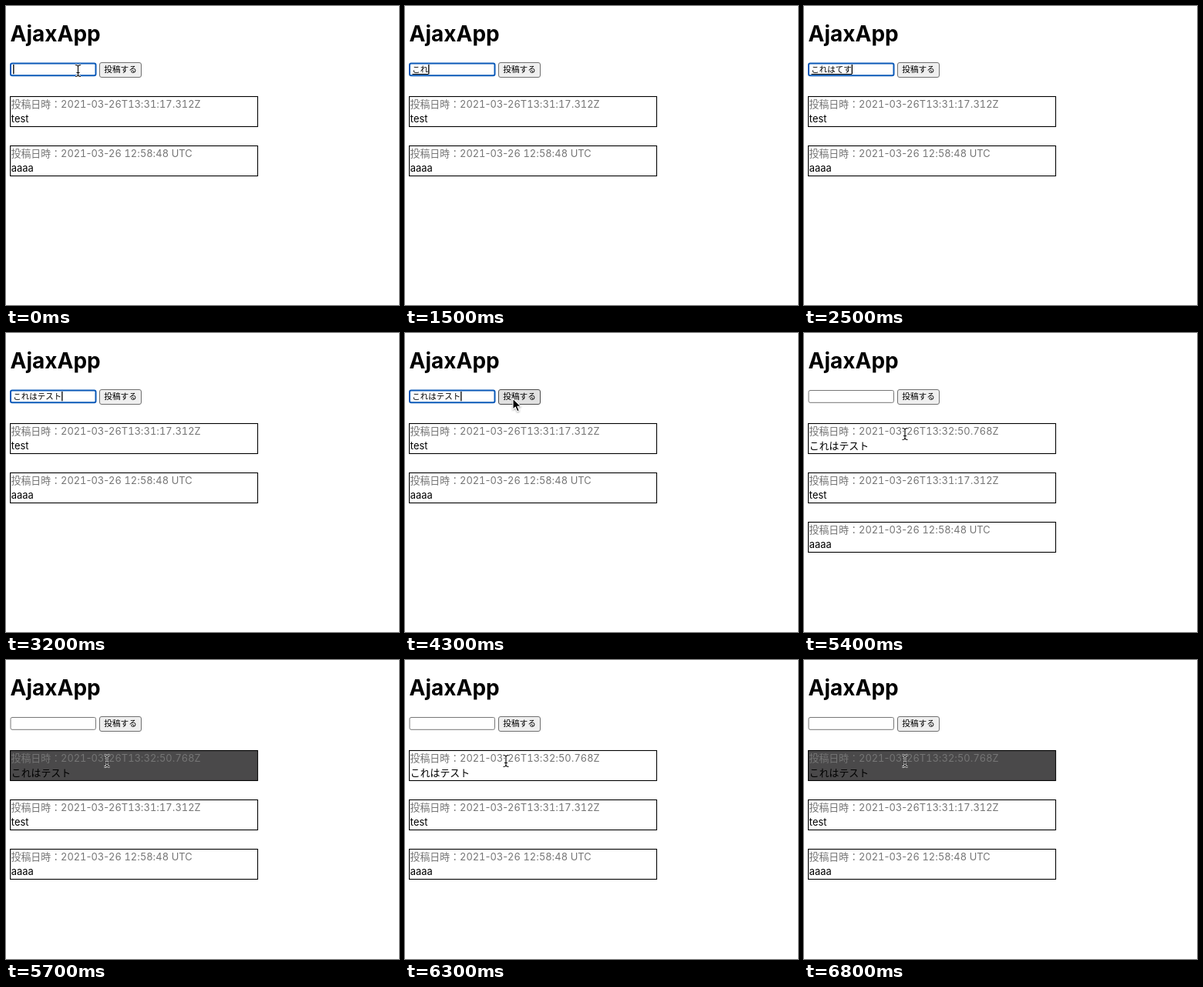
An HTML page that plays this animation: 510 px wide and 388 px high, repeating every 7.4 s.

```html
<!DOCTYPE html>
<html lang="ja">
<head>
<meta charset="utf-8">
<title>AjaxApp</title>
<style>
  html, body { margin: 0; width: 100%; height: 100%; overflow: hidden; background: #fff; }
  svg { display: block; width: 510px; height: 388px; }
  text {
    font: 12.9px Inter, "Noto Sans CJK JP", "Noto Sans CJK", sans-serif;
    font-feature-settings: "calt" 0;
    white-space: pre;
  }
  .num { font-feature-settings: "tnum" 1, "calt" 0; }
  .title { font-size: 28px; font-weight: 700; }
  .field { fill: #fff; stroke: #767676; }
  .focus .field { stroke: #0a59b8; stroke-width: 2; }
  .typed { font-size: 10.5px; font-weight: 500; }
  .button rect { fill: #efefef; stroke: #707070; }
  .button text { font-size: 10.7px; font-weight: 500; }
  .button.hover rect { fill: #e1e1e1; stroke: #4c4c4c; }
  .button.active rect { fill: #f5f5f5; stroke: #8d8d8d; }
  .post rect { fill: #fff; stroke: #000; stroke-width: 1.1; }
  .post .date { fill: #757575; }
  .post.checked rect { fill: #4a494a; }
  .outline { fill: none; stroke: #fff; stroke-width: 2.6; stroke-linejoin: round; }
  .stem { fill: none; stroke: #000; stroke-width: 1.1; }
  .arrow { stroke: #fff; stroke-width: 1.1; stroke-linejoin: round; filter: drop-shadow(0 1px 1px rgba(0, 0, 0, .35)); }
</style>
</head>
<body>
<svg viewBox="0 0 510 388">
  <text class="title" x="5.5" y="45.5">AjaxApp</text>

  <g id="form">
    <rect class="field" x="6" y="74.5" width="110.5" height="15.8" rx="2"/>
    <text class="typed" id="typed" x="9.2" y="85.8"></text>
    <rect id="underline" x="9.5" y="88" height="1"/>
    <rect id="caret" y="76" width="1.3" height="12.3"/>
  </g>

  <g class="button" id="button">
    <rect x="121.5" y="73.5" width="54" height="19" rx="2.5"/>
    <text x="127.2" y="86.2">投稿する</text>
  </g>

  <g id="posts"></g>

  <g id="beam">
    <path class="outline" d="M-3.5-7.5Q0-7.5 0-5Q0-7.5 3.5-7.5M0-5V5M-3.5 7.5Q0 7.5 0 5Q0 7.5 3.5 7.5M-2 2.5H2"/>
    <path class="stem" d="M-3.5-7.5Q0-7.5 0-5Q0-7.5 3.5-7.5M0-5V5M-3.5 7.5Q0 7.5 0 5Q0 7.5 3.5 7.5M-2 2.5H2"/>
  </g>
  <path class="arrow" id="arrow" d="M0 0V14.2L3.3 11.2L5.7 16.8L8.3 15.7L5.9 10.2H10.3Z"/>
</svg>

<script>
const LOOP = 7400;
const CHAR = 10.5;
const $ = id => document.getElementById(id);

// [start ms, text, underline thickness]
const typing = [
  [0, '', 0],
  [1000, 'ｋ', 1], [1200, 'こ', 1], [1300, 'こｒ', 1], [1400, 'これ', 1],
  [1900, 'これｈ', 1], [2000, 'これは', 1], [2100, 'これはｔ', 1], [2200, 'これはて', 1],
  [2300, 'これはてｓ', 1], [2500, 'これはてす', 1],
  [2800, 'これはてすｔ', 1], [2900, 'これはてすと', 1],
  [3000, 'これはテスト', 1.6], [3200, 'これはテスト', 0],
  [4600, '', 0]
];

// [start ms, pointer shape, x, y]
const pointer = [
  [0, 'beam', 93.5, 84], [1200, '', 0, 0],
  [3700, 'beam', 93.5, 84], [3800, 'beam', 98, 82], [3900, 'beam', 107, 79],
  [4000, 'arrow', 120, 77], [4100, 'arrow', 131, 80], [4200, 'arrow', 137, 83], [4300, 'arrow', 140, 85],
  [5000, 'arrow', 139, 89], [5100, 'arrow', 137, 98], [5200, 'arrow', 135, 109],
  [5300, 'beam', 132, 125], [5400, 'beam', 131, 131]
];

// Digits share one width, punctuation keeps its own.
const tabular = date => date.replace(/\d+/g, '<tspan class="num">$&</tspan>');

const posts = [
  ['2021-03-26T13:32:50.768Z', 'これはテスト'],
  ['2021-03-26T13:31:17.312Z', 'test'],
  ['2021-03-26 12:58:48 UTC', 'aaaa']
].map(([date, body]) => {
  const g = document.createElementNS('http://www.w3.org/2000/svg', 'g');
  g.setAttribute('class', 'post');
  g.innerHTML = `<rect x="5.6" y="117.5" width="321" height="39"/>
    <text class="date" x="6.6" y="132">投稿日時：${tabular(date)}</text>
    <text x="6.8" y="151">${body}</text>`;
  $('posts').append(g);
  return g;
});

const at = (list, t) => list.filter(step => step[0] <= t).pop();
const within = (t, from, to) => t >= from && t < to;
const show = (el, on) => { el.style.display = on ? '' : 'none'; };

function draw(t) {
  const [, text, line] = at(typing, t);
  const [, shape, x, y] = at(pointer, t);
  const focused = t < 4500;
  const sent = t >= 4600;
  const end = text.length * CHAR;

  $('form').classList.toggle('focus', focused);
  $('typed').textContent = text;
  $('underline').setAttribute('width', end);
  $('underline').setAttribute('height', line);
  $('caret').setAttribute('x', 9.2 + end);
  show($('caret'), focused && !within(t, 400, 900) && !within(t, 3700, 4200));

  for (const id of ['beam', 'arrow']) {
    show($(id), shape === id);
    $(id).setAttribute('transform', `translate(${x} ${y})`);
  }
  const over = shape === 'arrow' && x > 121 && y < 93;
  $('button').classList.toggle('hover', over);
  $('button').classList.toggle('active', within(t, 4500, 4600));

  posts.forEach((post, i) => {
    show(post, sent || i > 0);
    post.setAttribute('transform', `translate(0 ${64 * (sent ? i : i - 1)})`);
  });
  posts[0].classList.toggle('checked', within(t, 5700, 6300) || t >= 6800);
}

const start = performance.now();
function tick() {
  draw((performance.now() - start) % LOOP);
  requestAnimationFrame(tick);
}
tick();
</script>
</body>
</html>
```
